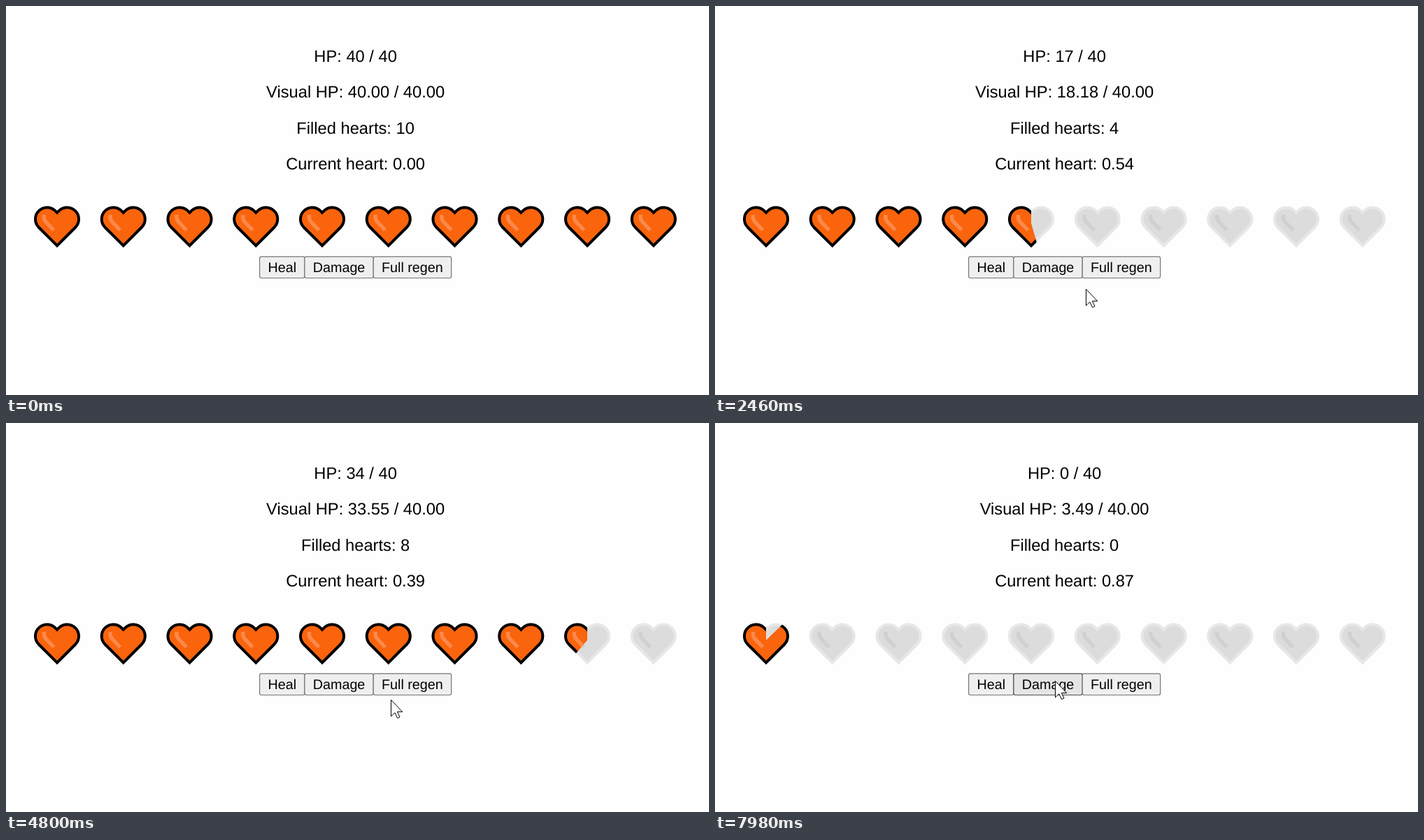
An HTML page for the animation above (8 s loop, 1005 by 557 pixels).

```html
<!DOCTYPE html>
<html lang="en">
<head>
<meta charset="utf-8">
<title>Heart health bar</title>
<style>
  html, body { margin: 0; width: 100%; height: 100%; overflow: hidden; background: #fefefe; }
  svg { display: block; width: 1005px; height: 557px; }
  text {
    font-family: "Liberation Sans", Arial, sans-serif;
    font-size: 23.69px;
    text-anchor: middle;
    text-rendering: geometricPrecision;
  }
  .button text { font-size: 19.74px; }
  .button rect { fill: #efefef; stroke: #767676; stroke-width: 1.2; }
  .button.hover rect { fill: #e5e5e5; stroke: #4f4f4f; }
</style>
</head>
<body>
<svg viewBox="0 0 1005 557">
  <defs>
    <path id="outline" d="M0 343.1 L-26.6 316.5 A16.7 16.7 0 0 1 -3 292.9 L0 295.9 L3 292.9 A16.7 16.7 0 0 1 26.6 316.5 Z"
      stroke-width="4"/>
    <path id="shine" d="M-18.6 299 v4 q0 3.5 3 6.5 l11 11.5" fill="none" stroke-width="5.4"/>
    <g id="empty">
      <use href="#outline" fill="#dcdcdc" stroke="#e7e7e7"/>
      <use href="#shine" stroke="#d0d0d0"/>
    </g>
    <g id="full">
      <use href="#outline" fill="#fa640c" stroke="#000"/>
      <use href="#shine" stroke="#fb894a"/>
    </g>
    <clipPath id="sector"><path id="wedge"/></clipPath>
  </defs>
  <g id="labels"></g>
  <g id="hearts"></g>
  <g id="buttons"></g>
  <path id="cursor" d="M0.5 0.5 V24 L5.9 18.8 L9.6 26.6 L13 25 L9.4 17.6 H16.8 Z"
    fill="#fff" stroke="#000" stroke-linejoin="round"/>
</svg>
<script>
const LOOP = 8000, STEP = 60, MAX = 40, PER_HEART = 4, MID = 499.6;
const RATE = 0.00435;

// time of click, HP afterwards
const CLICKS = [[1776.4, 17], [3965, 34], [5732, 21], [7567.4, 0]];

// key points of the pointer: time, x, y
const PATH = [
  [60, 983, 115], [240, 758, 259], [420, 545, 346], [840, 440, 372],
  [1020, 408, 374], [1260, 408, 374], [1560, 482, 384], [2100, 515, 385],
  [2460, 530, 405], [2700, 505, 412], [3420, 394, 374], [3960, 392, 376],
  [4560, 510, 401], [4800, 550, 396], [5100, 690, 392], [5520, 512, 384],
  [6060, 522, 378], [6540, 588, 402], [7260, 494, 369], [7980, 486, 369]
];

const TOP = 358.5, BOTTOM = 390;
let edge = 362.6;
const BUTTONS = [["Heal", 64.3], ["Damage", 98.3], ["Full regen", 111.4]]
  .map(([name, width]) => ({ name, width, left: edge, right: edge += width }));

const byId = id => document.getElementById(id);

function add(parent, tag, attrs, content) {
  const el = document.createElementNS("http://www.w3.org/2000/svg", tag);
  for (const key in attrs) el.setAttribute(key, attrs[key]);
  if (content) el.textContent = content;
  return parent.appendChild(el);
}

const labels = [0, 1, 2, 3].map(i =>
  add(byId("labels"), "text", { x: MID, y: 80 + i * 51.3 }));

const hearts = Array.from({ length: MAX / PER_HEART }, (_, i) => {
  const g = add(byId("hearts"), "g", { transform: `translate(${73 + i * 94.75} 0)` });
  add(g, "use", { href: "#empty" });
  const clip = add(g, "g", {});
  add(clip, "use", { href: "#full" });
  return clip;
});

for (const b of BUTTONS) {
  b.el = add(byId("buttons"), "g", { class: "button" });
  add(b.el, "rect", { x: b.left, y: TOP + 0.3, width: b.width, height: BOTTOM - TOP - 0.8, rx: 2.4 });
  add(b.el, "text", { x: b.left + b.width / 2, y: 381.2 }, b.name);
}

function health(t) {
  let hp = MAX, shown = MAX;
  for (const [time, next] of CLICKS) {
    if (t < time) break;
    shown = next + (hp - next) * Math.exp(-RATE * (t - time));
    hp = next;
  }
  return { hp, shown };
}

const slope = (i, axis) =>
  (PATH[i + 1][axis] - PATH[i][axis]) / (PATH[i + 1][0] - PATH[i][0]);

// tangent that never overshoots a key point
function tangent(i, axis) {
  if (i === 0) return slope(0, axis);
  if (i === PATH.length - 1) return 0;
  const a = slope(i - 1, axis), b = slope(i, axis);
  return a * b > 0 ? 2 * a * b / (a + b) : 0;
}

function pointer(t) {
  if (t < PATH[0][0]) return null;
  const next = PATH.findIndex(p => p[0] > t);
  if (next < 0) return PATH[PATH.length - 1].slice(1);
  const i = next - 1, span = PATH[next][0] - PATH[i][0];
  const k = (t - PATH[i][0]) / span, ease = k * k * (3 - 2 * k);
  return [1, 2].map(axis =>
    PATH[i][axis] * (1 - ease) + PATH[next][axis] * ease +
    span * k * (1 - k) * (tangent(i, axis) * (1 - k) - tangent(next, axis) * k));
}

// counter-clockwise pie slice from twelve o'clock
function slice(part) {
  const a = part * 2 * Math.PI, r = 70, cy = 311;
  const x = -r * Math.sin(a), y = cy - r * Math.cos(a);
  return `M0 ${cy} V${cy - r} A${r} ${r} 0 ${part > 0.5 ? 1 : 0} 0 ${x} ${y} Z`;
}

function draw(t) {
  const { hp, shown } = health(t);
  const filled = Math.floor(shown / PER_HEART);
  const part = shown / PER_HEART - filled;
  [
    `HP: ${hp} / ${MAX}`,
    `Visual HP: ${shown.toFixed(2)} / ${MAX.toFixed(2)}`,
    `Filled hearts: ${filled}`,
    `Current heart: ${part.toFixed(2)}`
  ].forEach((s, i) => { labels[i].textContent = s; });

  byId("wedge").setAttribute("d", slice(part));
  hearts.forEach((h, i) => {
    h.style.display = i > filled || (i === filled && part < 0.001) ? "none" : "";
    if (i === filled) h.setAttribute("clip-path", "url(#sector)");
    else h.removeAttribute("clip-path");
  });

  const tip = pointer(t);
  const cursor = byId("cursor");
  cursor.style.display = tip ? "" : "none";
  if (tip) cursor.setAttribute("transform", `translate(${tip[0]} ${tip[1]})`);
  for (const b of BUTTONS) {
    const over = tip && tip[0] >= b.left && tip[0] < b.right && tip[1] >= TOP && tip[1] < BOTTOM;
    b.el.classList.toggle("hover", !!over);
  }
}

const start = performance.now();
function tick() {
  const t = (performance.now() - start) % LOOP;
  draw(Math.floor(t / STEP) * STEP);
  requestAnimationFrame(tick);
}
tick();
</script>
</body>
</html>
```
